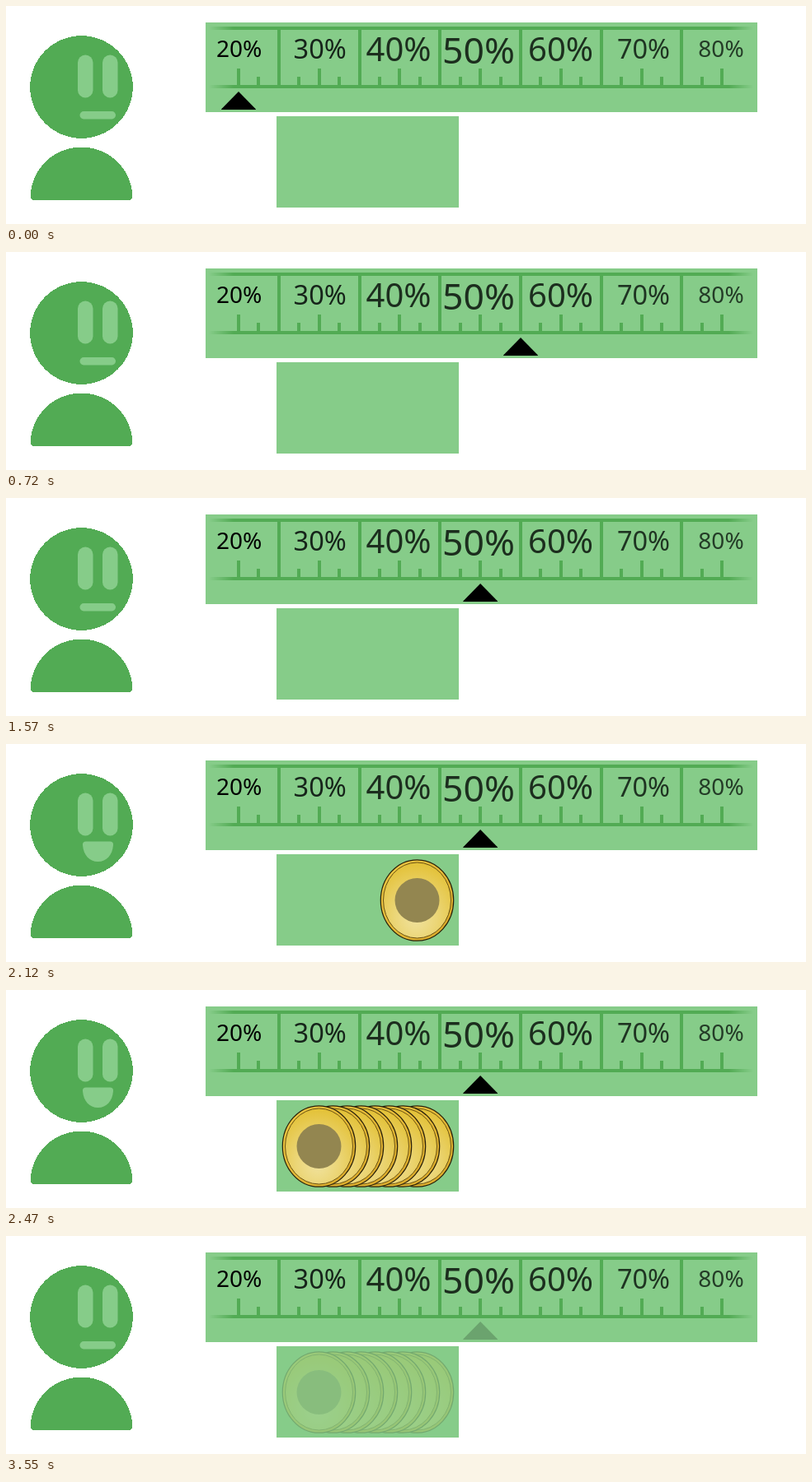
Animation, 970 px wide and 265 px high, one loop 3.59 s. Source, as an HTML page:

```html
<!DOCTYPE html>
<html lang="en">
<head>
<meta charset="utf-8">
<title>Percent slider</title>
<style>
  html, body { margin: 0; width: 100%; height: 100%; overflow: hidden; background: #fff; }
  svg { display: block; width: 970px; height: 265px; }
  text { font-family: "Noto Sans", "Open Sans", sans-serif; text-anchor: middle; }
  .dark { fill: #52ab54; }
  .light { fill: #86cc89; }
</style>
</head>
<body>
<svg viewBox="0 0 970 265">
  <defs>
    <linearGradient id="fade" gradientUnits="userSpaceOnUse" x1="246" y1="0" x2="906" y2="0">
      <stop offset="0" stop-color="#52ab54" stop-opacity="0"/>
      <stop offset=".045" stop-color="#52ab54"/>
      <stop offset=".955" stop-color="#52ab54"/>
      <stop offset="1" stop-color="#52ab54" stop-opacity="0"/>
    </linearGradient>
    <linearGradient id="rim" x1="0" y1="0" x2="1" y2="1">
      <stop offset="0" stop-color="#efca45"/>
      <stop offset="1" stop-color="#d9a727"/>
    </linearGradient>
    <radialGradient id="face" cx=".48" cy=".72" r=".72">
      <stop offset="0" stop-color="#f1e3a0"/>
      <stop offset=".45" stop-color="#ebd575"/>
      <stop offset="1" stop-color="#e3c136"/>
    </radialGradient>
    <g id="coin">
      <ellipse rx="44.2" ry="49.2" fill="url(#rim)" stroke="#2a210a" stroke-width="1.2"/>
      <ellipse rx="41" ry="46" fill="url(#face)" stroke="#6b5212" stroke-width="1"/>
      <circle r="27" fill="#938650"/>
    </g>
  </defs>

  <g shape-rendering="crispEdges">
    <circle class="dark" cx="91.5" cy="98.5" r="62.3"/>
    <path class="dark" d="M29.6 230A62 62 0 0 1 153.4 230Q154 236 148 236H35Q29 236 29.6 230Z"/>
  </g>
  <g class="light">
    <rect x="87" y="59.5" width="18.5" height="52" rx="9.2"/>
    <rect x="117" y="59.5" width="18.5" height="52" rx="9.2"/>
    <rect id="flat" x="89.5" y="128" width="43.5" height="9.5" rx="4.7"/>
    <path id="smile" d="M97 118.5H126Q130.5 118.5 130 123C129 135 122 143 111.5 143S94 135 93 123Q92.5 118.5 97 118.5Z"/>
    <rect x="242" y="20" width="669" height="109"/>
    <rect x="328" y="134" width="221" height="111"/>
  </g>

  <g id="ruler">
    <rect x="246" y="25" width="660" height="4" fill="url(#fade)"/>
    <rect x="246" y="96" width="660" height="4" fill="url(#fade)"/>
  </g>
  <g id="coins"></g>
  <path id="pointer" d="M0 104L21 125.5Q21 126 20 126H-20Q-21 126 -21 125.5Z"/>
</svg>
<script>
  const LOOP = 3590, COIN_START = 2120, FADE_START = 3470;
  const START_X = 282, TICK = 24.43;

  const byId = id => document.getElementById(id);
  function add(parent, tag, attrs) {
    const el = document.createElementNS("http://www.w3.org/2000/svg", tag);
    for (const key in attrs) el.setAttribute(key, attrs[key]);
    parent.appendChild(el);
    return el;
  }

  // Scale: quarter marks between the first and last centre ticks.
  const ruler = byId("ruler");
  for (let i = 0; i <= 24; i++) {
    const top = i % 4 === 2 ? 27 : i % 4 === 0 ? 76 : 86;
    const x = Math.round(START_X + i * TICK) - 2;
    add(ruler, "rect", { class: "dark", x, y: top, width: 4, height: 98 - top });
  }

  // Label: centre x, baseline, font size, colour.
  const labels = [
    [282.7, 61.5, 28, "#000"],
    [380.7, 64, 32.5, "#16241a"],
    [476, 67, 40, "#1c2e1e"],
    [573, 70, 44.5, "#1c2e1e"],
    [672.5, 67, 40, "#1c2e1e"],
    [773, 64, 32.5, "#1f3422"],
    [867, 61.5, 28, "#243c27"]
  ];
  labels.forEach(([x, y, size, fill], i) => {
    add(ruler, "text", { x, y, fill, "font-size": size }).textContent = (i + 2) * 10 + "%";
  });

  const coins = Array.from({ length: 8 }, (_, i) =>
    add(byId("coins"), "use", { href: "#coin", x: 498.5 - 17 * i, y: 190 }));

  // After the run to the right: time, tick position.
  const settle = [[640, 15], [720, 14], [820, 13], [920, 12], [1070, 11], [1220, 10], [1370, 11], [1570, 12]];
  function pointerTick(t) {
    let tick = Math.min(14, Math.floor(t / 40));
    for (const [time, value] of settle) if (t >= time) tick = value;
    return tick;
  }

  const show = (el, on) => el.setAttribute("visibility", on ? "visible" : "hidden");
  const pointer = byId("pointer"), stack = byId("coins");

  function draw(t) {
    const happy = t >= COIN_START && t < FADE_START;
    show(byId("smile"), happy);
    show(byId("flat"), !happy);
    coins.forEach((coin, i) => show(coin, t >= COIN_START + 50 * i));
    pointer.setAttribute("transform", `translate(${START_X + TICK * pointerTick(t)} 0)`);
    const alpha = t < FADE_START ? 1 : 0.6 - 0.2 * Math.floor((t - FADE_START) / 40);
    pointer.setAttribute("opacity", alpha);
    stack.setAttribute("opacity", alpha);
  }

  const begin = performance.now();
  function frame() {
    draw((performance.now() - begin) % LOOP);
    requestAnimationFrame(frame);
  }
  frame();
</script>
</body>
</html>
```
